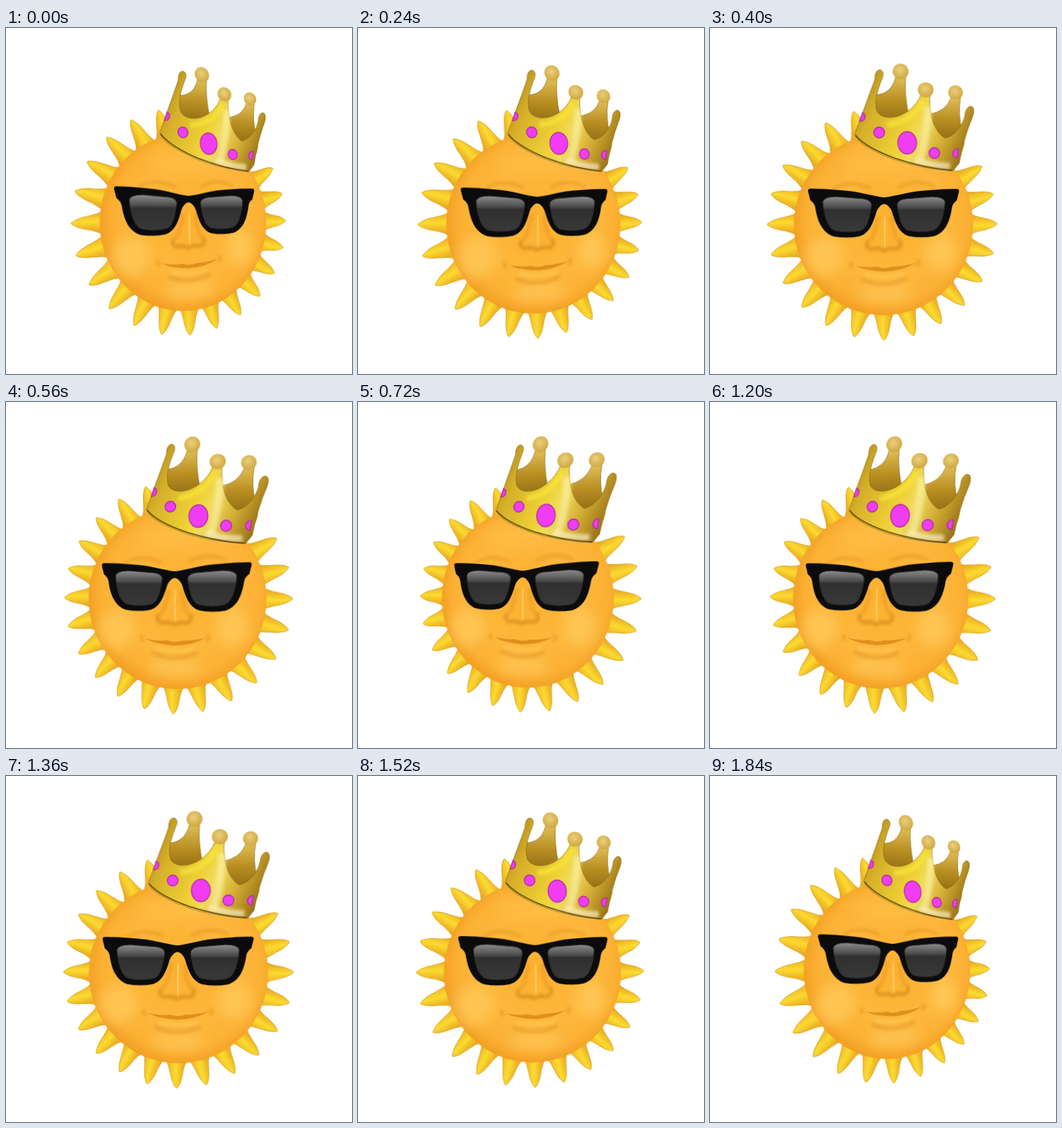
An HTML page without scripts for the animation above (1.92 s loop, 480 by 480 pixels).

```html
<!DOCTYPE html>
<html lang="en">
<head>
<meta charset="utf-8">
<title>Sun with crown</title>
<style>
  html, body { margin: 0; width: 100%; height: 100%; overflow: hidden; background: #fff; }

  /* --a: turn angle, --s: size; the head swings there and back */
  .head {
    display: block;
    width: 480px;
    height: 480px;
    transform-origin: 239px 272px;
    transform:
      perspective(490px)
      translate(calc(var(--a) * .82px), calc((var(--s) - 1) * 120px))
      rotate(calc(var(--a) * -.05deg))
      rotateY(calc(var(--a) * 1deg))
      scale(var(--s));
    animation: turn 960ms step-end -1ms infinite alternate;
  }
  @keyframes turn {
    0%      { --a: 17;    --s: .975 }
    8.333%  { --a: 16.3;  --s: .978 }
    16.667% { --a: 14.3;  --s: .985 }
    25%     { --a: 11.1;  --s: .991 }
    33.333% { --a: 7.1;   --s: .996 }
    41.667% { --a: 2.4;   --s: 1 }
    50%     { --a: -2.4;  --s: 1 }
    58.333% { --a: -7.1;  --s: .999 }
    66.667% { --a: -11.1; --s: .996 }
    75%     { --a: -14.3; --s: .99 }
    83.333% { --a: -16.3; --s: .985 }
    91.667%, 100% { --a: -17; --s: .983 }
  }
</style>
</head>
<body>
<svg class="head" viewBox="0 0 480 480">
  <defs>
    <radialGradient id="skin" cx=".52" cy=".48" r=".54">
      <stop offset="0" stop-color="#fdb02f"/>
      <stop offset=".6" stop-color="#fdb83c"/>
      <stop offset=".84" stop-color="#fbb033"/>
      <stop offset="1" stop-color="#f09c20"/>
    </radialGradient>
    <linearGradient id="flame">
      <stop offset="0" stop-color="#dc9a1a"/>
      <stop offset=".3" stop-color="#f0b926"/>
      <stop offset=".55" stop-color="#fbdb30"/>
      <stop offset=".75" stop-color="#f5c42a"/>
      <stop offset="1" stop-color="#e5a620"/>
    </linearGradient>
    <linearGradient id="gold" x1="0" y1=".2" x2="1" y2=".6">
      <stop offset="0" stop-color="#a98218"/>
      <stop offset=".2" stop-color="#d6b02a"/>
      <stop offset=".5" stop-color="#efd136"/>
      <stop offset=".62" stop-color="#f1dc5e"/>
      <stop offset=".8" stop-color="#d4ae34"/>
      <stop offset="1" stop-color="#9a7416"/>
    </linearGradient>
    <linearGradient id="inside" x1="0" y1="0" x2="0" y2="1">
      <stop offset="0" stop-color="#dfbd55"/>
      <stop offset=".5" stop-color="#b98f22"/>
      <stop offset="1" stop-color="#8f6b14"/>
    </linearGradient>
    <radialGradient id="ball" cx=".45" cy=".4" r=".6">
      <stop offset="0" stop-color="#ecd07c"/>
      <stop offset="1" stop-color="#cfa740"/>
    </radialGradient>
    <linearGradient id="glass" x1="0" y1="0" x2="0" y2="1">
      <stop offset="0" stop-color="#8c8c8c"/>
      <stop offset=".3" stop-color="#4c4c4c"/>
      <stop offset=".38" stop-color="#303030"/>
      <stop offset="1" stop-color="#383838"/>
    </linearGradient>
    <filter id="soft" x="-30%" y="-60%" width="160%" height="220%"><feGaussianBlur stdDeviation="2"/></filter>
    <filter id="haze" x="-50%" y="-80%" width="200%" height="260%"><feGaussianBlur stdDeviation="8"/></filter>
    <path id="ray" d="M-17-116Q-10-127-8-141Q-6-153-1-159Q0-160 1-159Q7-151 9-139Q11-127 17-116Z" fill="url(#flame)" stroke="#d79c1c" stroke-width=".8"/>
    <g id="rays">
      <use href="#ray"/>
      <use href="#ray" transform="rotate(15)"/>
      <use href="#ray" transform="rotate(30)"/>
      <use href="#ray" transform="rotate(45)"/>
      <use href="#ray" transform="rotate(60)"/>
      <use href="#ray" transform="rotate(75)"/>
    </g>
    <path id="rim" d="M242 235C228 234 205 226 180 225Q160 223 141 223Q136 223 137 227L140 239Q146 243 147 250C150 270 157 284 172 289Q190 292 207 289C222 285 227 268 231 255Q235 245 242 244Z"/>
    <path id="lens" d="M157 241Q159 234 176 234L213 237Q226 239 224 248C221 265 218 278 209 281Q190 285 174 281C163 278 158 258 157 241Z"/>
  </defs>

  <g transform="translate(239 272)">
    <g transform="scale(1 1.01)">
      <use href="#rays"/>
      <use href="#rays" transform="rotate(90)"/>
      <use href="#rays" transform="rotate(180)"/>
      <use href="#rays" transform="rotate(270)"/>
    </g>
    <ellipse cx="1" cy="1" rx="124.5" ry="125.5" fill="url(#skin)"/>
  </g>

  <g transform="translate(-2)">
    <!-- face -->
    <g filter="url(#haze)">
      <ellipse cx="158" cy="318" rx="26" ry="28" fill="#ffc858" opacity=".75"/>
      <ellipse cx="322" cy="312" rx="22" ry="26" fill="#ffc858" opacity=".75"/>
      <ellipse cx="243" cy="368" rx="38" ry="12" fill="#ffc655" opacity=".8"/>
      <ellipse cx="235" cy="185" rx="50" ry="18" fill="#ffc048" opacity=".5"/>
    </g>
    <g fill="none" stroke="#cf8015" stroke-linecap="round" filter="url(#soft)">
      <path d="M172 223Q190 210 222 222M262 221Q288 208 312 220" stroke-width="4" opacity=".4"/>
      <path d="M233 262Q229 284 223 294M252 262Q254 284 260 294" stroke-width="4" opacity=".4"/>
      <path d="M219 296Q214 304 224 307Q233 304 241 309Q251 304 258 307Q267 304 264 295" stroke-width="4" opacity=".75"/>
      <path d="M212 349Q242 362 272 348" stroke-width="5" opacity=".4"/>
      <path d="M196 325Q192 329 198 332M288 323Q293 327 287 330" stroke-width="3" opacity=".5"/>
    </g>
    <path d="M242 264L243 300" stroke="#ffd06a" stroke-width="7" stroke-linecap="round" filter="url(#soft)" opacity=".75"/>
    <path d="M200 329Q219 333 232 331Q242 335 253 331Q270 331 286 326Q268 337 242 338Q216 337 200 329Z" fill="#d58212" opacity=".75"/>
    <path d="M215 342Q242 349 270 341" fill="none" stroke="#ffc552" stroke-width="4" filter="url(#soft)"/>

    <!-- sunglasses -->
    <g fill="#0b0b0c">
      <use href="#rim"/>
      <use href="#rim" transform="matrix(-1 0 0 1 483.5 0)"/>
    </g>
    <g fill="url(#glass)" stroke="#242424" stroke-width="1">
      <use href="#lens"/>
      <use href="#lens" transform="matrix(-1 0 0 1 484 0)"/>
    </g>

    <!-- crown -->
    <g stroke="#8a6814" stroke-width=".7" stroke-linejoin="round">
      <path d="M229 93Q252 92 258 68H272Q270 91 276 120L258 133L229 123Z" fill="url(#inside)"/>
      <path d="M303 119Q328 116 336 95H349Q345 118 351 141L329 157L308 148Z" fill="url(#inside)"/>
      <path d="M201 148L229 72Q229 58 237 58Q244 61 238 73C232 89 228 103 232 116C242 132 279 124 293 93H306C304 123 314 145 327 152C341 149 352 134 355 121Q356 109 363 107Q371 108 366 122Q354 150 347 187L338 198Q264 193 216 164Q203 155 201 148Z" fill="url(#gold)"/>
    </g>
    <g fill="url(#ball)">
      <ellipse cx="265" cy="60" rx="11" ry="11"/>
      <ellipse cx="342" cy="88" rx="10.5" ry="10"/>
      <ellipse cx="300" cy="85" rx="11" ry="10.5"/>
    </g>
    <g filter="url(#soft)">
      <path d="M296 100Q282 130 246 134" fill="none" stroke="#f8e63a" stroke-width="7" opacity=".8"/>
      <path d="M303 108Q304 140 292 182" fill="none" stroke="#fbf0a4" stroke-width="11" opacity=".65"/>
      <path d="M284 183Q311 191 334 191" fill="none" stroke="#fff6d2" stroke-width="9" opacity=".65"/>
    </g>
    <path d="M202 149Q216 166 258 181Q302 195 337 197" fill="none" stroke="#5d430c" stroke-width="1.6"/>
    <g fill="#f03df3" stroke="#b02fa0" stroke-width="1.4">
      <path d="M208 130L212 118Q217 120 215 126Q213 130 208 130Z"/>
      <ellipse cx="235" cy="145" rx="7.5" ry="7.5"/>
      <ellipse cx="274" cy="159" rx="13" ry="15.5"/>
      <ellipse cx="312" cy="173" rx="7.5" ry="7.5"/>
      <path d="M346 167L344 180Q338 179 338 173Q340 166 346 167Z"/>
    </g>
  </g>
</svg>
</body>
</html>
```
